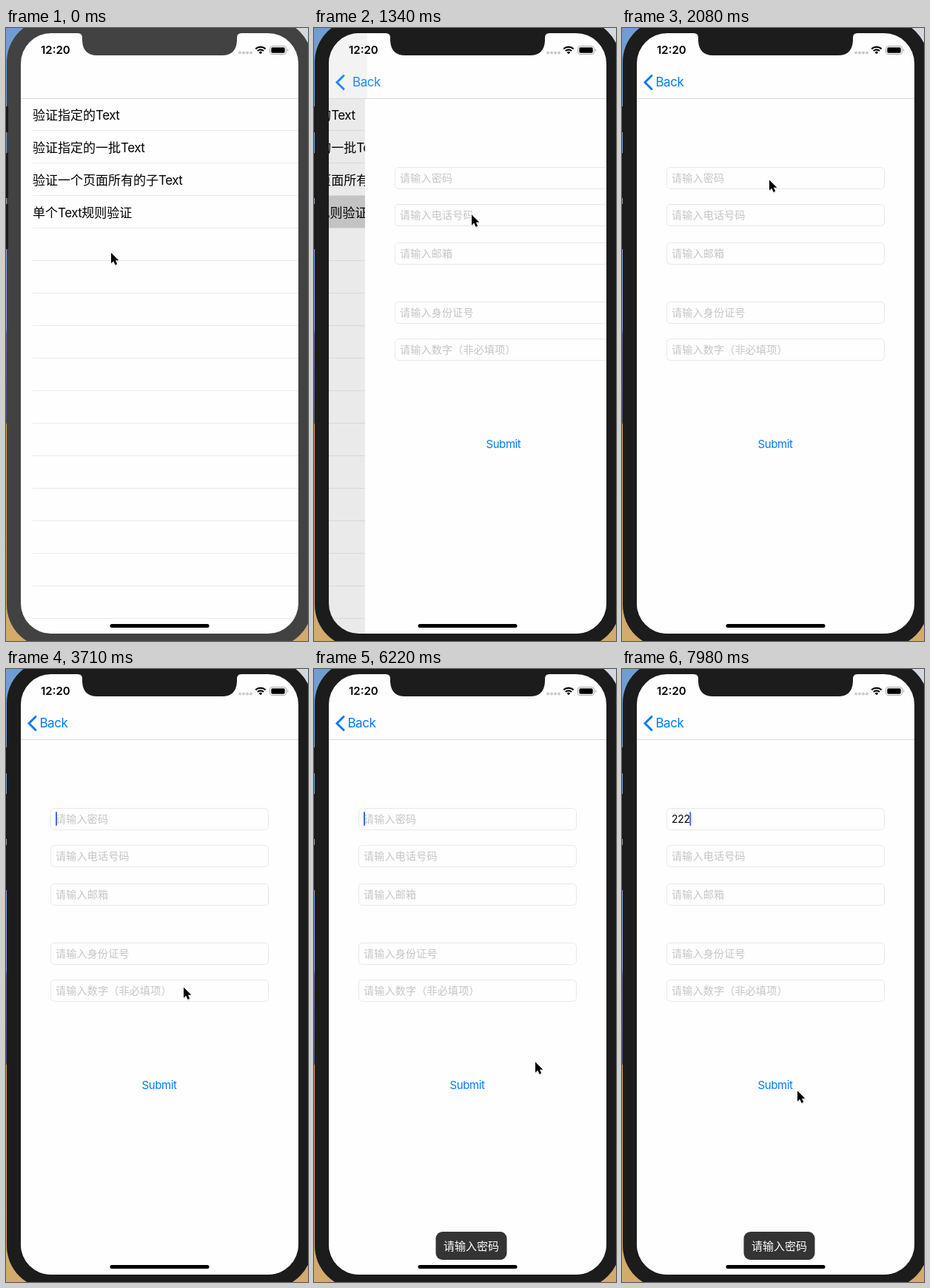
An HTML page that plays this animation: 408 px wide and 829 px high, repeating every 8 s.

```html
<!DOCTYPE html>
<html lang="zh-CN">
<head>
<meta charset="utf-8">
<style>
  html, body { margin: 0; width: 100%; height: 100%; overflow: hidden; }
  svg { display: block; font-family: Inter, "Noto Sans CJK SC", "Noto Sans CJK", sans-serif; }
  text { white-space: pre; }
  .row { font-size: 17px; }
  .hint { font-size: 14px; fill: #c5c5c8; letter-spacing: .25px; }
  .blue { fill: #007aff; }
</style>
</head>
<body>
<svg width="408" height="829" viewBox="0 0 408 829">
  <defs>
    <linearGradient id="sky" x2="0" y2="1">
      <stop offset="0" stop-color="#6f9dd3"/>
      <stop offset=".49" stop-color="#86a8d4"/>
      <stop offset=".5" stop-color="#5a6a94"/>
      <stop offset=".645" stop-color="#46527a"/>
      <stop offset=".646" stop-color="#dba45c"/>
      <stop offset="1" stop-color="#d3ab6c"/>
    </linearGradient>
    <clipPath id="screen"><rect x="20" y="7" width="375" height="812" rx="41"/></clipPath>
  </defs>

  <rect width="408" height="829" fill="url(#sky)"/>
  <rect x="380" width="28" height="60" fill="#d3d7e0"/>
  <g id="shell">
    <rect x="1" y="-12" width="413" height="850" rx="58"/>
    <path d="M0 106h3v35h-3zM0 169h3v61h-3zM0 238h3v61h-3z" fill="#1b1b1b"/>
  </g>

  <g clip-path="url(#screen)">
    <rect x="20" y="7" width="375" height="812" fill="#fefefe"/>
    <g id="list">
      <rect id="selected" x="20" y="226.5" width="375" height="44.5" fill="#d4d4d4"/>
    </g>
    <rect id="dim" x="20" y="96" width="375" height="723"/>
    <g id="page">
      <rect x="20" y="96" width="375" height="723" fill="#fefefe"/>
      <text id="submit" class="blue" x="183.5" y="567.5" font-size="15" letter-spacing="-.4">Submit</text>
      <text id="typed" x="67" y="207.5" font-size="14" letter-spacing="-.3"></text>
      <rect id="caret" y="193" width="2" height="19" rx="1" fill="#3f6be0"/>
    </g>
    <rect id="navShade" x="20" y="7" height="88" fill="#f2f2f2"/>
    <path d="M20 95.5h375" stroke="#d9d9d9"/>
    <g id="back">
      <path d="M40 64.5l-9 9 9 9" fill="none" stroke="#007aff" stroke-width="3" stroke-linecap="round"/>
      <text id="backLabel" class="blue" x="45.5" y="79" font-size="17" letter-spacing="-.5">Back</text>
    </g>

    <text x="47" y="35" font-size="15" font-weight="600">12:20</text>
    <g fill="#cacaca">
      <circle cx="316" cy="33.5" r="2"/><circle cx="321" cy="33.5" r="2"/>
      <circle cx="326" cy="33.5" r="2"/><circle cx="331" cy="33.5" r="2"/>
    </g>
    <path d="M337.2 28.3a9.5 9.5 0 0 1 13.4 0M339.8 31a5.8 5.8 0 0 1 8.2 0" fill="none" stroke="#000" stroke-width="2.2"/>
    <path d="M343.9 35.3l-2.3-2.4a3.3 3.3 0 0 1 4.6 0z"/>
    <rect x="356.5" y="24.5" width="22" height="11" rx="3" fill="none" stroke="#a6a6a6"/>
    <rect x="358.3" y="26.3" width="18.4" height="7.4" rx="1.6"/>
    <path d="M380 28a2.2 2.2 0 0 1 0 4z" fill="#a6a6a6"/>

    <g id="toast">
      <rect x="164.5" y="761" width="96" height="38" rx="9" fill="#343434"/>
      <text x="212.5" y="786" font-size="15" fill="#fff" text-anchor="middle">请输入密码</text>
    </g>
    <rect x="140.5" y="806" width="134" height="5" rx="2.5"/>
  </g>
  <path id="notch" d="M97 0V7Q103 7 103 13V17Q104 37 123 37H292Q311 37 312 17V13Q312 7 318 7V0z"/>

  <g id="cursor">
    <path d="M0 2v14.5l3.4-3 2.4 5.2 2.8-1.2-2.3-5h4.4z" fill="#000" opacity=".2"/>
    <path d="M0 .5v14.2l3.2-3 2.4 5.2 2.6-1.1-2.3-5.1h4.4z" stroke="#fff" stroke-width="1.8" paint-order="stroke"/>
  </g>
</svg>
<script>
const LOOP = 8000, TICK = 147.8;
const $ = id => document.getElementById(id);
const el = Object.fromEntries([...document.querySelectorAll('[id]')].map(e => [e.id, e]));
const clamp = v => Math.max(0, Math.min(1, v));
const show = (node, visible) => node.setAttribute('opacity', +visible);
const shift = (node, x, y = 0) => node.setAttribute('transform', `translate(${x} ${y})`);

// Latin letters sit a little tighter than the Chinese ones
const tighten = s => s.replace(/[a-z]+/gi, '<tspan letter-spacing="-.5">$&</tspan>');

const rows = ['验证指定的Text', '验证指定的一批Text', '验证一个页面所有的子Text', '单个Text规则验证'];
let listMarkup = '';
for (let i = 0; i < 16; i++) {
  const y = 138.5 + 44 * i;
  listMarkup += `<path d="M36 ${y}h359" stroke="#eaeaea"/>`;
  if (rows[i]) listMarkup += `<text class="row" x="36" y="${y - 15}">${tighten(rows[i])}</text>`;
}
el.list.insertAdjacentHTML('beforeend', listMarkup);

const fields = [[188, '请输入密码'], [238, '请输入电话号码'], [290, '请输入邮箱'],
                [370, '请输入身份证号'], [420, '请输入数字（非必填项）']];
el.submit.insertAdjacentHTML('beforebegin', fields.map(([y, hint]) =>
  `<rect x="60.5" y="${y + .5}" width="294" height="29" rx="5" fill="none" stroke="#e8e8e8"/>
   <text class="hint" x="67" y="${y + 19.5}">${hint}</text>`).join(''));
const passwordHint = document.querySelector('.hint');

// Pointer path: tick, x, y
const path = [
  [0, 142, 303.5], [1, 160, 291], [2, 200, 261], [3, 213, 252], [11, 213, 252], [14, 199, 205],
  [23, 199, 205], [25, 240, 430], [27, 277, 630], [28, 277, 630], [32, 244, 578], [33, 242, 572],
  [35, 242, 572], [36, 302, 582], [40, 303, 589], [41, 303, 589], [42, 299, 531], [44, 230, 380],
  [47, 150, 260], [48, 150, 260], [50, 33, 139], [51, 60, 210], [53, 214, 535], [54, 237, 570]
];

function pointerAt(tick) {
  const i = Math.max(1, path.findIndex(k => k[0] >= tick));
  const [t0, x0, y0] = path[i - 1], [t1, x1, y1] = path[i];
  const f = (tick - t0) / (t1 - t0);
  return [x0 + (x1 - x0) * f, y0 + (y1 - y0) * f];
}

// Critically damped push from the list to the form
function pushAt(time) {
  const d = Math.max(0, time - 1080) * .0142;
  const p = 1 - (1 + d) * Math.exp(-d);
  return p > .999 ? 1 : p;
}

function caretAlpha(tick, time) {
  if (tick < 23) return 0;
  if (time < 4100 || (tick >= 44 && tick < 49)) return 1;
  return clamp(.75 + 1.6 * Math.cos((time - 4100) / 1020 * 2 * Math.PI));
}

function draw(t) {
  const tick = Math.min(54, Math.floor((t + 2) / TICK));
  const time = tick * TICK;
  const push = pushAt(time);
  const offset = 375 * (1 - push);

  const bezel = tick < 7 ? '#424242' : '#1c1c1c';
  el.shell.setAttribute('fill', bezel);
  el.notch.setAttribute('fill', bezel);

  shift(el.list, -112.5 * push);
  shift(el.page, offset);
  show(el.selected, tick >= 8);
  show(el.dim, .09 * push);
  show(el.navShade, push < 1 ? push : 0);
  el.navShade.setAttribute('width', push < 1 ? offset + 3 : 0);
  show(el.back, push);
  shift(el.backLabel, offset * .135);

  const typed = '2'.repeat(Math.max(0, Math.min(3, tick - 43)));
  el.typed.textContent = typed;
  show(passwordHint, !typed);
  el.caret.setAttribute('x', 67 + 8.1 * typed.length);
  show(el.caret, caretAlpha(tick, time));

  show(el.submit, tick === 34 || tick === 35 ? .2 : tick === 36 ? .6 : 1);
  show(el.toast, tick >= 36);
  shift(el.cursor, ...pointerAt(tick));
}

function loop() {
  draw(performance.now() % LOOP);
  requestAnimationFrame(loop);
}
loop();
</script>
</body>
</html>
```
